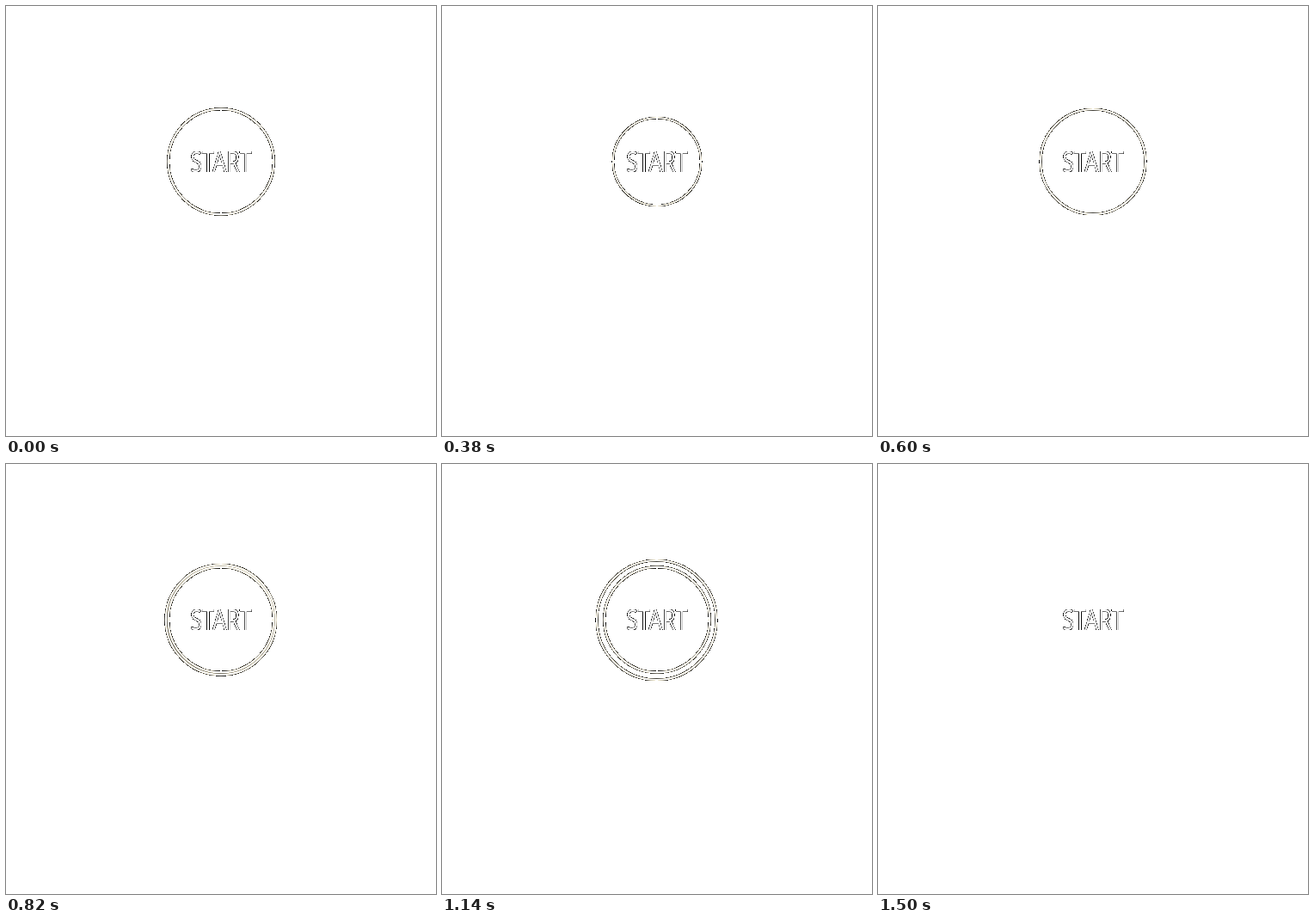
An HTML page with a canvas for the animation above (1520 ms loop, 500 px wide and 500 px high).

```html
<!DOCTYPE html>
<html lang="en">
<head>
<meta charset="utf-8">
<title>Start button</title>
<style>
  html, body { margin: 0; width: 100%; height: 100%; overflow: hidden; background: #fff; }
  canvas { display: block; width: 500px; height: 500px; }
</style>
</head>
<body>
<canvas id="stage" width="500" height="500" role="img" aria-label="START"></canvas>
<script>
const LOOP = 1520, STEP = 20;
const PRESS = 300, RELEASE = 640, HIDE = 1500;
const R = 62.5, R_MIN = 50.5, LINE = 2.4;
const CX = 250, CY = 181;
const BOX = { x: 160, y: 92, size: 180 };

const ctx = document.getElementById('stage').getContext('2d', { willReadFrequently: true });

const ease = p => (1 - Math.cos(Math.PI * p)) / 2;

function buttonRadius(t) {
  if (t >= RELEASE) return R;
  const press = t < PRESS ? ease(t / PRESS) : 1 - ease((t - PRESS) / (RELEASE - PRESS));
  return R + (R_MIN - R) * press;
}

// Outer edge of the wave, speeding up towards the end
const waveRadius = age => R + 0.01444 * age + 7.2e-9 * age ** 3;

// r is the outer edge of the ring
function ring(x, y, r, width) {
  ctx.lineWidth = width;
  ctx.beginPath();
  ctx.arc(x, y, r - width / 2, 0, 2 * Math.PI);
  ctx.stroke();
}

function label() {
  ctx.save();
  ctx.translate(CX, 193);
  ctx.scale(0.79, 1);
  ctx.font = '32px "Open Sans", "Noto Sans", sans-serif';
  ctx.textAlign = 'center';
  ctx.fillText('START', 0, 0);
  ctx.restore();
}

// White shapes on a black matte: only the soft edge pixels show
function matte() {
  const { x, y, size } = BOX;
  const img = ctx.getImageData(x, y, size, size);
  const px = img.data;
  for (let i = 0; i < px.length; i += 4) {
    const a = px[i + 3];
    if (a < 6) { px[i + 3] = 0; continue; }
    const n = i / 4;
    const dx = x + n % size - CX, dy = y + Math.floor(n / size) - CY;
    const warm = a < 250 && Math.hypot(dx, dy) > 45;
    const v = a < 250 ? a : 255;
    px[i] = v;
    px[i + 1] = warm ? v * 0.97 : v;
    px[i + 2] = warm ? v * 0.87 : v;
    px[i + 3] = 255;
  }
  ctx.putImageData(img, x, y);
}

function draw(t) {
  ctx.clearRect(0, 0, 500, 500);
  ctx.fillStyle = ctx.strokeStyle = '#fff';
  label();
  if (t < HIDE) {
    const r = buttonRadius(t);
    ring(CX, CY, r, LINE * r / R);
    if (t > RELEASE) {
      const age = t - RELEASE;
      const shift = 0.5 * Math.min(1, age / 440);
      ring(CX - shift, CY + shift, waveRadius(age), LINE);
    }
  }
  matte();
}

let last = -1;
function tick() {
  const t = Math.floor(performance.now() % LOOP / STEP) * STEP;
  if (t !== last) draw(last = t);
  requestAnimationFrame(tick);
}
tick();
</script>
</body>
</html>
```
